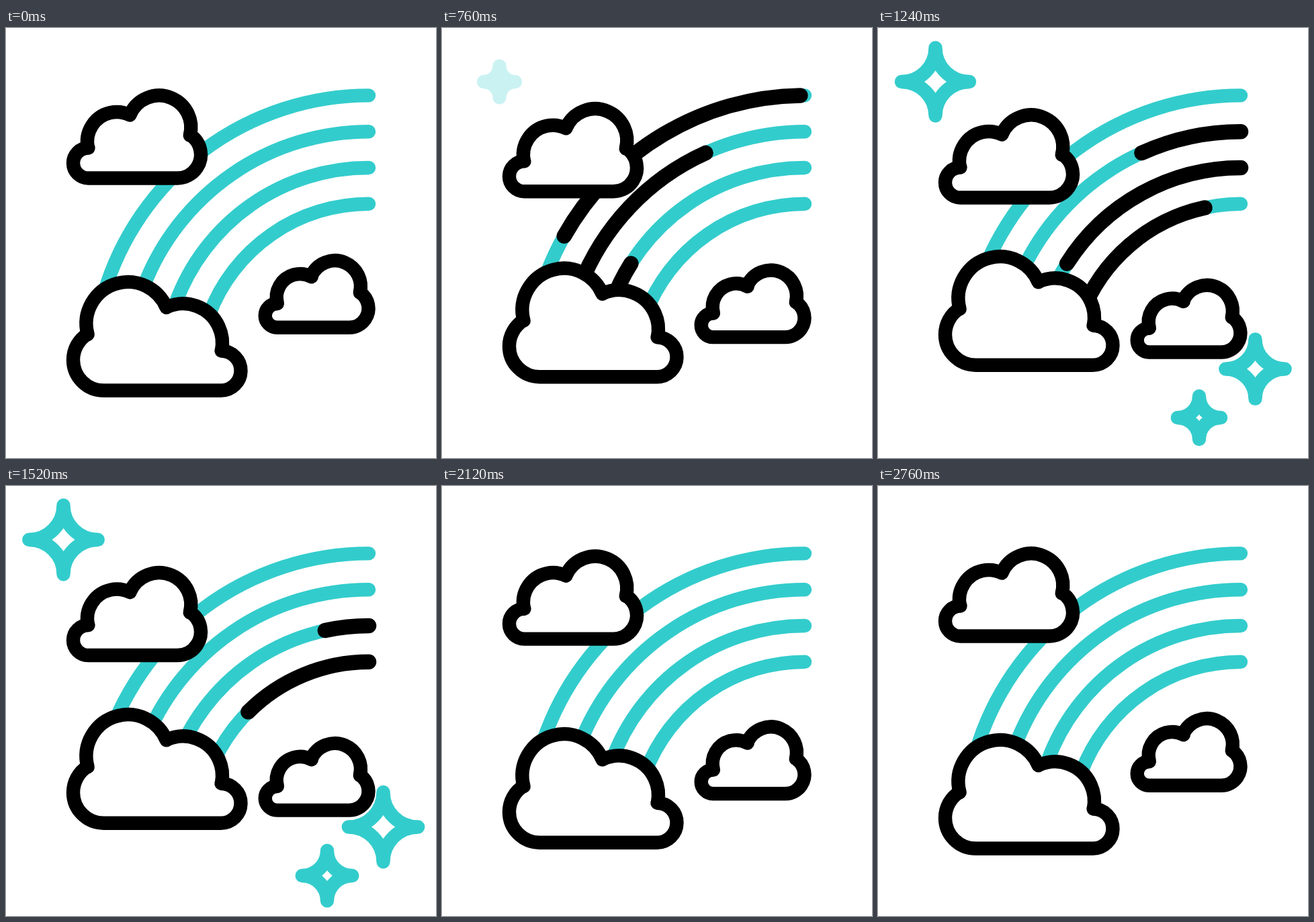
An HTML page with a canvas for the animation above (3 s loop, 640 px wide and 640 px high).

```html
<!DOCTYPE html>
<html lang="en">
<head>
<meta charset="utf-8">
<title>Rainbow and clouds</title>
<style>
  html, body { margin: 0; width: 100%; height: 100%; overflow: hidden; background: #fff; }
  canvas { display: block; width: 640px; height: 640px; }
</style>
</head>
<body>
<canvas id="stage" width="640" height="640"></canvas>
<script>
const ctx = document.getElementById('stage').getContext('2d');
const LOOP = 3000, STEP = 40;
const TEAL = '#33cccc', BLACK = '#000';
const RAD = Math.PI / 180;

// Bands: top y, centre y, start angle, head start time, tail start time
const bands = [
  { top: 100.4, cy: 511.5, from: 16.5, head: 200, tail: 600 },
  { top: 154.2, cy: 513, from: 21, head: 400, tail: 880 },
  { top: 208, cy: 514, from: 20, head: 600, tail: 1080 },
  { top: 261.8, cy: 515.5, from: 20.5, head: 800, tail: 1280 }
];
const SWEEP = 600;

// Clouds: lobes [x, y, r] clockwise from bottom left, and the notches between them
const clouds = [
  {
    lobes: [[122.5, 201, 22.5], [165, 169, 44], [228, 147.8, 47.3], [255, 188.5, 35]],
    notches: [[122.5, 178.5], [184.7, 129.3], [274, 160]],
    shift: 29, up: [200, 1120], down: [1440, 2360]
  },
  {
    lobes: [[145.5, 494, 45.5], [181.5, 440, 62], [263.5, 468.8, 58.5], [320, 510, 29.5]],
    notches: [[121.5, 456], [239, 416], [320.5, 480.5]],
    shift: -37.8, up: [280, 1200], down: [1560, 2400]
  },
  {
    lobes: [[403.5, 428, 17.8], [437.7, 401, 35], [489.5, 384.6, 38.4], [511, 417.3, 28.5]],
    notches: [[403.5, 410.2], [455, 369.8], [526.8, 394]],
    shift: 36.8, up: [360, 1280], down: [1640, 2440]
  }
];

const stars = [
  { x: 85.5, y: 80, r: 55, grow: [720, 1400] },
  { x: 561.5, y: 507.5, r: 55.5, grow: [898, 1468] },
  { x: 478, y: 580, r: 40, grow: [1072, 1348] }
];
const SHRINK = [1460, 1740], FADE = 160, SMALL = 0.42;

const clamp = v => Math.min(1, Math.max(0, v));
const span = (t, a, b) => clamp((t - a) / (b - a));
const smooth = x => x * x * (3 - 2 * x);

// Symmetric cubic ease-in-out, solved by bisection
function ease(x) {
  const a = 0.417;
  let lo = 0, hi = 1;
  for (let i = 0; i < 24; i++) {
    const s = (lo + hi) / 2, q = 1 - s;
    const v = 3 * s * q * q * a + 3 * s * s * q * (1 - a) + s * s * s;
    if (v < x) lo = s; else hi = s;
  }
  return smooth((lo + hi) / 2);
}

function stroke(color, width) {
  ctx.strokeStyle = color;
  ctx.lineWidth = width;
  ctx.stroke();
}

function arcPart(b, from, to, color, width) {
  const angle = u => (180 + b.from + (90 - b.from) * u) * RAD;
  ctx.beginPath();
  ctx.arc(540, b.cy, b.cy - b.top, angle(from), angle(to));
  stroke(color, width);
}

function drawBand(b, t) {
  arcPart(b, 0, 1, TEAL, 20.4);
  const head = smooth(span(t, b.head, b.head + SWEEP));
  const tail = smooth(span(t, b.tail, b.tail + SWEEP));
  if (head > tail) arcPart(b, tail, head, BLACK, 22.6);
}

function drawCloud(c, t) {
  const dy = c.shift * (ease(span(t, ...c.up)) - ease(span(t, ...c.down)));
  const toward = (p, l) => p ? Math.atan2(p[1] - l[1], p[0] - l[0]) : Math.PI / 2;
  ctx.save();
  ctx.translate(0, dy);
  ctx.beginPath();
  c.lobes.forEach((l, i) => {
    ctx.arc(l[0], l[1], l[2], toward(c.notches[i - 1], l), toward(c.notches[i], l));
  });
  ctx.closePath();
  ctx.fillStyle = '#fff';
  ctx.fill();
  stroke(BLACK, 20.4);
  ctx.restore();
}

function drawStar(s, t) {
  const start = s.grow[0], end = SHRINK[1];
  const alpha = Math.min(span(t, start, start + FADE), 1 - span(t, end - FADE, end));
  if (alpha <= 0) return;
  const size = smooth(span(t, ...s.grow)) - smooth(span(t, ...SHRINK));
  const r = s.r * (SMALL + (1 - SMALL) * size);
  // Draw opaque, then veil with white so overlapping strokes stay even
  ctx.beginPath();
  for (let i = 0; i < 4; i++) {
    const a = i * Math.PI / 2 - Math.PI / 4;
    const d = r * Math.SQRT2;
    ctx.arc(s.x + d * Math.cos(a), s.y + d * Math.sin(a), r,
      a - Math.PI * 3 / 4, a + Math.PI * 3 / 4, true);
  }
  ctx.closePath();
  ctx.globalAlpha = alpha;
  stroke(TEAL, 20.4);
  ctx.globalAlpha = 1;
}

function draw(t) {
  ctx.fillStyle = '#fff';
  ctx.fillRect(0, 0, 640, 640);
  ctx.lineCap = ctx.lineJoin = 'round';
  bands.forEach(b => drawBand(b, t));
  clouds.forEach(c => drawCloud(c, t));
  stars.forEach(s => drawStar(s, t));
}

function tick() {
  const t = performance.now() % LOOP;
  draw(Math.floor(t / STEP) * STEP);
  requestAnimationFrame(tick);
}
tick();
</script>
</body>
</html>
```
